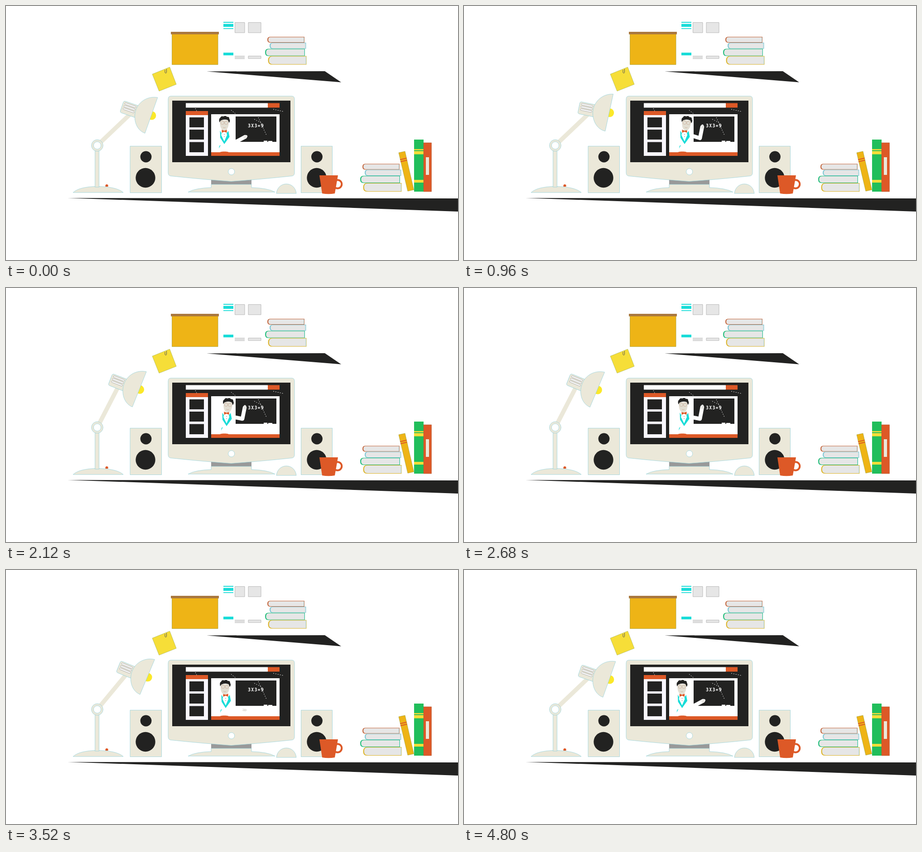
An HTML page for the animation above (4840 ms loop, 998 px wide and 561 px high).

```html
<!DOCTYPE html>
<html lang="en">
<head>
<meta charset="utf-8">
<title>Desk lesson</title>
<style>
html, body { margin: 0; width: 100%; height: 100%; overflow: hidden; background: #fff; }
svg { display: block; width: 100vw; height: 100vh; }
.beige { fill: #ebe8d9; }
.dark { fill: #222221; }
.orange { fill: #dd5927; }
.yellow { fill: #f6de38; }
.gold { fill: #eeb416; }
.cyan { fill: #18dcd8; }
.page { fill: #e6e6e6; }
.white { fill: #fff; }
.edge { stroke: #8ccfda; stroke-width: .7; }
.grey { stroke: #aaa; stroke-width: .8; }
.limb { fill: none; stroke: #fff; stroke-linecap: round; stroke-linejoin: round; }
.glint { fill: none; stroke: #fff; stroke-width: 1; stroke-dasharray: 2 3; }
.chalk { font: bold 10px "Noto Sans Mono", monospace; letter-spacing: 1.2px; fill: #fff; }
</style>
</head>
<body>
<svg viewBox="0 0 998 561" preserveAspectRatio="none">
  <defs><g id="stack"></g></defs>

  <!-- shelf -->
  <path class="dark" d="M443 144.5 704 144 740 168.5Z"/>
  <path class="gold" stroke="#a9a33c" stroke-width=".8" d="M366.5 61H468V129.5H366.5Z"/>
  <path fill="#a9773f" d="M364 57H470V62.5H364Z"/>
  <path class="cyan" d="M480 35H502V37H480ZM480 39.5H502V46H480ZM480 49H502V50.7H480ZM480 103H502V109H480Z"/>
  <path class="page grey" d="M505.5 36.5H527V59H505.5ZM535 36.5H563V59H535ZM535 110.5H563V116H535Z"/>
  <path class="grey" d="M505 110.5H527M505 112.5H527M505 114.5H527M505 116.5H527"/>
  <use href="#stack"/>
  <path class="yellow" stroke="#a5b45a" stroke-width=".7" d="M323 150.5 361.5 135 376 173 338 188Z"/>
  <path fill="none" stroke="#555" d="M351 141V147Q353 150 354.5 147V139"/>

  <!-- desk -->
  <path class="dark" d="M136 424 998 425V454Z"/>

  <!-- lamp -->
  <path class="orange" d="M219.5 399V395.5Q222.5 392 225.5 395.5V399Z"/>
  <path class="beige edge" d="M148 412Q162 399 201 398.5Q245 399 259 412Z"/>
  <path class="beige edge" d="M196.5 316H205.5V400H196.5Z"/>
  <line id="arm" stroke="#ebe8d9" stroke-width="9.5" x1="201.5" y1="308"/>
  <circle class="beige edge" cx="201.5" cy="308" r="12.8"/>
  <circle class="white edge" cx="201.5" cy="308" r="8.2"/>
  <g id="shade">
    <circle cx="49" cy="2" r="9.5" fill="#fbe829"/>
    <rect class="beige edge" x="-22" y="-25" width="42" height="27" rx="4" transform="rotate(19)"/>
    <path class="beige edge" d="M62 -38C45 -41 30 -34 21 -23C5 -4 9 32 34 41Z"/>
    <g class="white" stroke="#999" stroke-width=".7" transform="rotate(19)">
      <rect x="-18" y="-22" width="26" height="3.4" rx="1.7"/>
      <rect x="-18" y="-16" width="26" height="3.4" rx="1.7"/>
      <rect x="-18" y="-10" width="26" height="3.4" rx="1.7"/>
    </g>
  </g>

  <!-- speakers, mouse, mug -->
  <path class="beige edge" d="M274 309.5H343.5V412.5H274ZM651.5 309.5H720.5V412.5H651.5Z"/>
  <g class="dark">
    <circle cx="309" cy="333" r="12.4"/><circle cx="308" cy="379.5" r="21.7"/>
    <circle cx="686.5" cy="333" r="12.4"/><circle cx="686" cy="379.5" r="21.7"/>
  </g>
  <path class="beige edge" d="M597 414C600 386 638 386 641 414Z"/>
  <circle cx="732" cy="393.5" r="9.3" fill="none" stroke="#dd5927" stroke-width="4"/>
  <path class="orange" d="M692 374H733L726 414Q712 416.500 698 414Z"/>

  <!-- monitor -->
  <path fill="#999" d="M453 380H542V395H453Z"/>
  <path class="beige edge" d="M453 394H542V401Q578 402 594 411H402Q418 402 453 401Z"/>
  <path class="beige edge" d="M364 199H631Q637 199 637 206V368Q637 375 631 375.500Q560 383 497 387.500Q435 383 364 375.500Q358 375 358 368V206Q358 199 364 199Z"/>
  <circle class="white edge" cx="497.700" cy="366" r="7"/>
  <path class="dark" d="M367 209H628V345H367Z"/>
  <path class="white" d="M397 214.500H578V224.500H397ZM453 239H604V323H453Z"/>
  <path fill="#f8f6fd" d="M397 241H446V331H397Z"/>
  <path class="orange" d="M578 214.500H604V224.500H578ZM397 232H446V241H397ZM453 323H604V331H453Z"/>
  <path class="dark" d="M405 246H437V268H405ZM405 273H437V295H405ZM405 300.500H437V323H405ZM507 244H597V300H507Z"/>
  <path class="glint" d="M557 246 575 285M548 250 566 259M497 230 508 239M418 226 421 232M590 228 612 233"/>
  <path class="white" d="M569 297.500H577V300H569ZM579 298H588V300H579Z"/>
  <text class="chalk" x="534" y="267.500">3X3=9</text>

  <!-- teacher -->
  <path id="sleeve" class="limb" stroke-width="8.500"/>
  <g id="hand">
    <ellipse class="white" rx="5.500" ry="3.400"/>
    <path fill="none" stroke="#c4c1b8" stroke-width=".7" d="M-5 -1.500H4M-3 .5H5M-5 2H3"/>
  </g>
  <path class="orange" d="M472 323Q475 321 482 321.500Q490 321 492 323Z"/>
  <g id="torso">
    <path class="cyan" d="M472.500 275.500 476 281 475 285 482 299 488 285 487 281 491 276 493.500 289 482 305 473 291ZM470 315 471 309 474 307Z"/>
    <path class="white" d="M477 279 482 297 487 279Z"/>
    <path fill="#222" d="M481.500 283h1v1h-1zM481.500 288h1v1h-1z"/>
    <path class="orange" d="M476.500 273 482 275.500 487.500 273V280L482 277.500 476.500 280Z"/>
  </g>
  <g id="head">
    <path fill="#e3dfd3" d="M472.500 252H491.500V262Q490 274 482 275Q474 274 472.500 262Z"/>
    <path class="dark" d="M471.500 257Q469 249 473 247Q475 242 480 244Q485 241 488 245Q493 244 493 249Q496 253 492.500 258L490 252Q482 249 474 253Z"/>
    <g fill="none" stroke="#c9ab98" stroke-width=".8">
      <circle cx="477.800" cy="258" r="3.700"/><circle cx="486.200" cy="258" r="3.700"/>
      <path d="M479 268Q482 270 485 268"/>
    </g>
  </g>

  <!-- books -->
  <use href="#stack" x="210" y="280.500"/>
  <path class="gold" stroke="#8d9a3c" stroke-width=".6" d="M867 324 881 321 900.500 406 887 409Z"/>
  <path stroke="#dd5927" stroke-width="2" d="M870 339.500 884.500 336M871 344 885.500 340.500"/>
  <path fill="#21be5b" d="M901 295H922V410H901Z"/>
  <path class="yellow" d="M901 316H922V318.500H901ZM901 320.500H922V327.500H901ZM901 384H922V390H901Z"/>
  <path class="orange" stroke="#a85f3c" stroke-width=".6" d="M922 302H939.500V410H922Z"/>
  <path class="beige" d="M927 334H934V373H927Z"/>
</svg>
<script>
const $ = id => document.getElementById(id);
const LOOP = 4840, STEP = 40;

// x, y, width, height, cover colour
const books = [
  [577, 68, 82, 13, '#c4683f'],
  [582, 81, 80.5, 13.5, '#7cc6d4'],
  [572, 94.5, 88, 16, '#21be7b'],
  [578.5, 110.5, 85, 19, '#dcb52c']
];
const spine = (x, y, w, h) => {
  const r = h / 2.2;
  return `M${x + w} ${y}H${x + r}Q${x} ${y} ${x} ${y + h / 2}Q${x} ${y + h} ${x + r} ${y + h}H${x + w}Z`;
};
$('stack').innerHTML = books.map(([x, y, w, h, color]) =>
  `<path fill="${color}" d="${spine(x, y, w, h)}"/>` +
  `<path class="page" d="${spine(x + 2.2, y + 1.1, w - 3, h - 2.2)}"/>` +
  `<path class="edge" d="M${x + w - 1.5} ${y + 1}V${y + h - 1}"/>`).join('');

// time, arm angle, shade tilt, torso shift, head shift, head tilt, elbow x y, hand x y
const poses = [
  [0, 43.6, 0, 0, 0, 0, 500, 304, 528, 289],
  [700, 43.6, -7.3, 5, 8, 5, 521, 292, 526, 267],
  [1000, 43.6, -7.3, 5, 8, 5, 521, 292, 526, 267],
  [1520, 62.2, 0, 5, 8, 5, 522, 289, 527, 264],
  [2200, 62.8, 2.5, 5, 7, 4, 522, 289, 527, 264],
  [2680, 62.8, 3.2, 4, 2, 0, 521, 289, 526, 263],
  [3520, 50.4, 3.2, 3, 1, 2, 500, 306, 527, 309],
  [4200, 46, 2.2, 0, -1, 0, 500, 306, 526, 310],
  [4800, 43.6, 0, -.5, -1, 0, 500, 304, 528, 289],
  [LOOP, 43.6, 0, 0, 0, 0, 500, 304, 528, 289]
];

function poseAt(t) {
  const i = poses.findIndex(p => p[0] > t);
  const a = poses[i - 1], b = poses[i];
  const k = (t - a[0]) / (b[0] - a[0]);
  return a.map((v, n) => v + (b[n] - v) * k);
}

function draw(t) {
  const [, angle, tilt, shift, headX, headTilt, ex, ey, hx, hy] = poseAt(t);
  const rad = angle * Math.PI / 180;
  const px = 201.5 + 98.5 * Math.cos(rad), py = 308 - 98.5 * Math.sin(rad);
  $('arm').setAttribute('x2', px);
  $('arm').setAttribute('y2', py);
  $('shade').setAttribute('transform', `translate(${px} ${py}) rotate(${tilt})`);
  $('torso').setAttribute('transform', `translate(${shift})`);
  $('head').setAttribute('transform', `translate(${headX}) rotate(${headTilt} 482 272)`);
  $('sleeve').setAttribute('d', `M${487 + shift} 283L${ex} ${ey}L${hx} ${hy}`);
  const reach = Math.atan2(hy - ey, hx - ex) * 180 / Math.PI;
  $('hand').setAttribute('transform', `translate(${hx} ${hy}) rotate(${reach})`);
}

const start = performance.now();
function tick(now) {
  const t = Math.max(0, now - start) % LOOP;
  draw(Math.floor(t / STEP) * STEP);
  requestAnimationFrame(tick);
}
draw(0);
requestAnimationFrame(tick);
</script>
</body>
</html>
```
